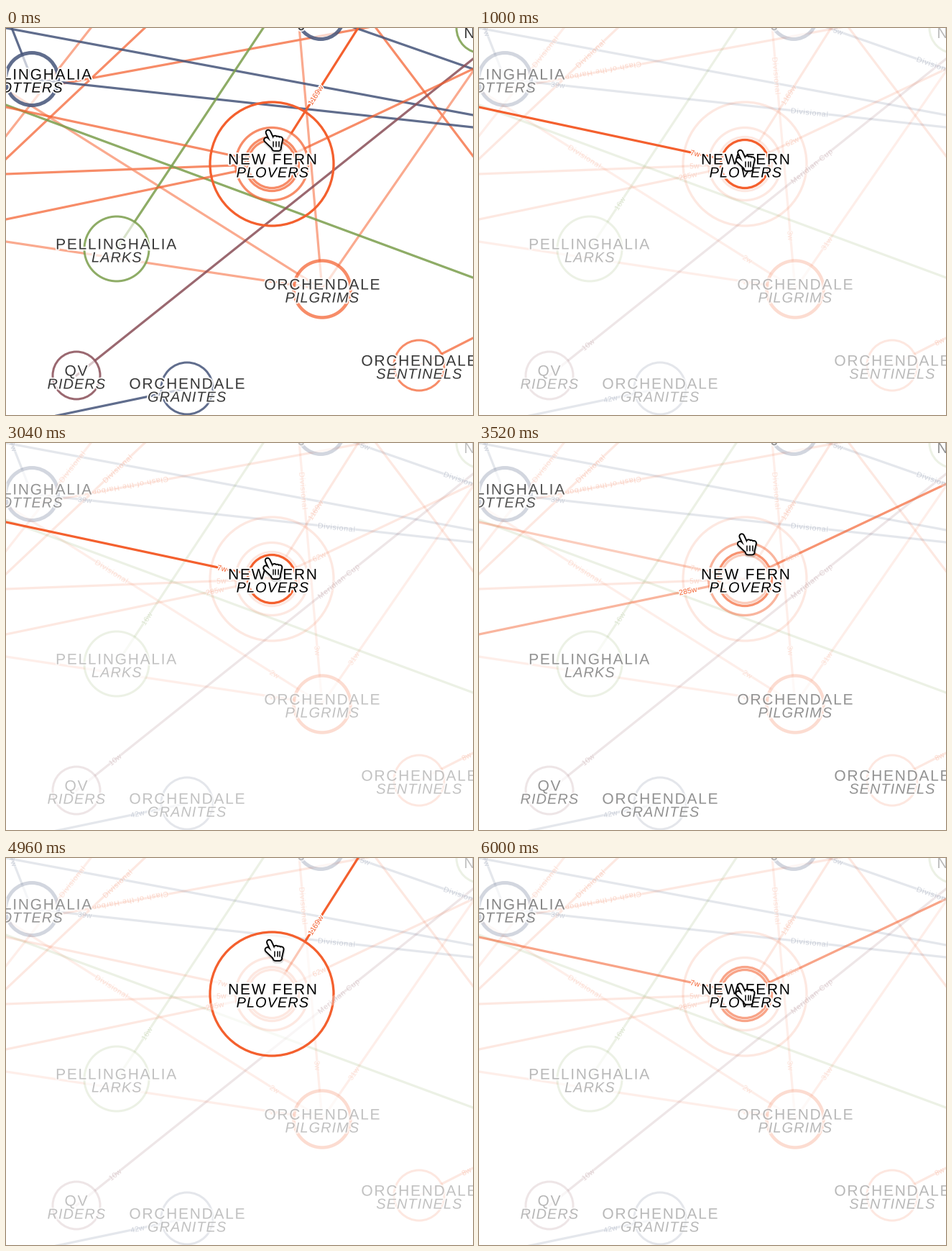
Animation, 650 px wide and 538 px high, one loop 6040 ms. Source, as a matplotlib script:

```python
import numpy as np
import matplotlib.pyplot as plt
from matplotlib.animation import FuncAnimation
from matplotlib.patches import Circle, PathPatch
from matplotlib.path import Path
from matplotlib.textpath import TextPath
from matplotlib.transforms import Affine2D

W, H = 650, 538
FRAMES, STEP = 151, 40
PX = 0.72  # points per pixel at 100 dpi
FADE = 400

ORANGE, PALE, NAVY = "#f4602e", "#f98a64", "#46557a"
GREEN, MAROON = "#7c9f4d", "#8a4f58"
FULL = {ORANGE: 0.72, PALE: 0.72}  # normal opacity, 0.86 for the others
FAINT = 0.14

fig = plt.figure(figsize=(W / 100, H / 100), dpi=100, facecolor="white")
ax = fig.add_axes([0, 0, 1, 1])
ax.set_xlim(0, W)
ax.set_ylim(H, 0)
ax.axis("off")


def mix(a, b, w):
    return a + (b - a) * w


def spaced_text(s, size, gap, style="normal"):
    """Letter-spaced outline of s, centred on x = 0, baseline at y = 0."""
    def outline(t):
        return TextPath((0, 0), t, size=size,
                        prop={"family": "Liberation Sans", "style": style})

    bar = outline("|").get_extents().x1
    glyphs = []
    for i, c in enumerate(s):
        if c != " ":
            x = outline(s[:i] + "|").get_extents().x1 - bar + gap * i
            glyphs.append(outline(c).transformed(Affine2D().translate(x, 0)))
    path = Path.make_compound_path(*glyphs)
    box = path.get_extents()
    return path.transformed(Affine2D().translate(-(box.x0 + box.x1) / 2, 0))


def add_text(path, x, y, z, color="black", angle=0, halo=4):
    """Draw a text outline over a white halo, return both."""
    path = path.transformed(
        Affine2D().scale(1, -1).rotate_deg(angle).translate(x, y))
    back = PathPatch(path, fc="white", ec="white", lw=halo * PX,
                     joinstyle="round", zorder=z)
    front = PathPatch(path, fc=color, ec="none", zorder=z + 0.1)
    ax.add_patch(back)
    ax.add_patch(front)
    return back, front


def add_ring(center, r, color, width, z):
    """Draw a white disc and its outline, return both."""
    disc = Circle(center, r, fc="white", ec="none", alpha=0.65, zorder=z)
    edge = Circle(center, r, fill=False, ec=color, lw=width * PX,
                  zorder=z + 0.1)
    ax.add_patch(disc)
    ax.add_patch(edge)
    return disc, edge


# Teams: centre, radius, colour, outline width, city, nickname
HUB = (370, 189)
OTTERS, LARKS, PILGRIMS = (36, 71), (154, 307), (440, 363)
SENTINELS, RIDERS, GRANITES = (575, 469), (98, 483), (252, 501)
TOP, CORNER = (438, -17), (662, 0)
TEAMS = [
    (OTTERS, 36.5, NAVY, 5, "PELLINGHALIA", "OTTERS"),
    (LARKS, 45, GREEN, 3, "PELLINGHALIA", "LARKS"),
    (PILGRIMS, 39.5, ORANGE, 4.5, "ORCHENDALE", "PILGRIMS"),
    (SENTINELS, 35, ORANGE, 3, "ORCHENDALE", "SENTINELS"),
    (RIDERS, 33, MAROON, 3, "QV", "RIDERS"),
    (GRANITES, 36, NAVY, 3, "ORCHENDALE", "GRANITES"),
    (TOP, 32.5, NAVY, 5, "", ""),
    (CORNER, 35, GREEN, 3, "", ""),
]
HUB_RADII = (33.5, 37.5, 50.5, 86)

# Links: colour, two ends, labels by their x on the line
LINKS = [
    (PALE, (0, 150), (118, 0), {92: "Divisional"}),
    (ORANGE, (0, 182), (193, 0), {155: "Divisional"}),
    (ORANGE, (515, -3), (36, 85), {174: "Clash of the Harbor"}),
    (ORANGE, (515, 0), (650, 178), {}),
    (ORANGE, (0, 203), HUB, {300: "5w"}),
    (PALE, (0, 297), PILGRIMS, {375: "2w"}),
    (PALE, (0, 86), PILGRIMS, {147: "Divisional", 374: "2w"}),
    (PALE, (408, -2), PILGRIMS, {414: "Divisional", 433.5: "3w"}),
    (PALE, PILGRIMS, (650, 60), {484: "31w"}),
    (ORANGE, SENTINELS, (650, 431), {641: "8w"}),
    (NAVY, (0, 0), (650, 121), {}),
    (NAVY, OTTERS, (650, 138), {110: "39w", 460: "Divisional"}),
    (NAVY, TOP, (650, 57), {500: "5w", 634: "Divisional"}),
    (NAVY, (8, 0), OTTERS, {10: "7w"}),
    (NAVY, (70, 539), GRANITES, {183: "42w"}),
    (GREEN, LARKS, (358, 0), {196: "16w"}),
    (GREEN, (0, 107), (650, 347), {}),
    (MAROON, RIDERS, (650, 43), {152: "10w", 463: "Meridian Cup"}),
]
# One link for each ring of the hub, from the inside out
HUB_LINKS = [
    (ORANGE, (0, 110), HUB, {301: "7w"}),
    (ORANGE, HUB, (650, 57), {436: "62w"}),
    (ORANGE, (0, 266), HUB, {291: "285w"}),
    (ORANGE, HUB, (490, 0), {431: "1169w"}),
]


def add_link(color, a, b, labels, z):
    (x0, y0), (x1, y1) = a, b
    line, = ax.plot([x0, x1], [y0, y1], color=color, lw=3.2 * PX, zorder=z)
    angle = np.degrees(np.arctan2(y1 - y0, x1 - x0))
    tags = []
    for x, s in labels.items():
        path = spaced_text(s, 10.5, 0.1 if s[0].isdigit() else 0.8)
        path = path.transformed(Affine2D().translate(0, -3.7))
        y = mix(y0, y1, (x - x0) / (x1 - x0))
        tags.append(add_text(path, x, y, 5, color, angle, 3))
    return line, FULL.get(color, 0.86), tags


def add_name(center, city, team):
    x, y = center
    return [add_text(spaced_text(city, 21, 1.7), x, y + 0.5, 7),
            add_text(spaced_text(team, 20, 1, "italic"), x, y + 18.5, 7)]


links = [add_link(*link, 2) for link in LINKS]
hub_links = [add_link(*link, 3) for link in HUB_LINKS]
rings = [add_ring(HUB, r, ORANGE, 3.3, 4.8 - 0.2 * k)
         for k, r in enumerate(HUB_RADII)]

nodes, names = [], []
for center, r, color, width, city, team in TEAMS:
    edge = add_ring(center, r, color, width, 4)[1]
    nodes.append((edge, FULL.get(color, 0.86), 0.048 * width))
    if city:
        names.append((add_name(center, city, team), 2 if team == "OTTERS" else 1))
names.append(([add_text(spaced_text("J", 21, 0, "italic"), 412, 3, 7),
               add_text(spaced_text("N", 21, 0), 645, 14, 7)], 1))
for back, front in add_name((HUB[0] + 1, HUB[1]), "NEW FERN", "PLOVERS"):
    back.set_alpha(0.95)


def hand_strokes():
    """Pointing hand with its finger tip at the origin, strokes split by nan."""
    strokes = [((-1.5, 4), (6, 20)), ((-4, 14.5), (6, 24)),
               ((7, 26.5), (13, 26.5))]
    strokes += [((8 + 3.7 * k, 12 + 0.8 * k), (7 + 3 * k, 24))
                for k in range(3)]
    creases = [((6 + 3.7 * k, 17), (6 + 3.7 * k, 24)) for k in range(3)]
    return [np.array([p for a, b in part for p in (a, b, (np.nan, np.nan))])
            for part in (strokes, strokes, strokes, creases)]


HAND = hand_strokes()
HAND[0] = HAND[0] + (0.5, 2)  # soft shadow
pens = [ax.plot([], [], color=color, alpha=alpha, lw=width * PX, zorder=9 + k,
                solid_capstyle="round", solid_joinstyle="round")[0]
        for k, (color, alpha, width) in enumerate(
            [("black", 0.14, 10), ("black", 1, 8.6), ("white", 1, 4.8),
             ("black", 1, 1.5)])]

# The pointer sweeps in, out and in again over the hub rings
SWEEPS = [(180, 200, (2, 1, 0)), (3200, 170, (1, 2, 3)), (5200, 300, (2, 1, 0))]
HOVERS = [(-FADE, 3)] + [(start + gap * k, ring) for start, gap, order in SWEEPS
                         for k, ring in enumerate(order)]
TIP_T = (0, 1000, 1400, 2600, 3700, 5050, 5400, 6040)
TIP_Y = (141, 169, 190, 190, 113, 113, 156, 175)


def hover_state(t):
    """Highlight of each ring, and the ring now under the pointer."""
    glow = np.zeros(4)
    ends = [start for start, _ in HOVERS[1:]] + [np.inf]
    for (start, ring), end in zip(HOVERS, ends):
        rise = np.clip((t - start) / FADE, 0, 1)
        fall = 1 - np.clip((t - end) / FADE, 0, 1)
        glow[ring] = max(glow[ring], min(rise, fall))
    return glow, [ring for start, ring in HOVERS if start <= t][-1]


def name_opacity(t, rest):
    """Names light up when a sweep starts, then sink back."""
    pulse = rest
    for start, _, _ in SWEEPS:
        age = t - start
        pulse = max(pulse, np.clip(1 + age / 120, 0, 1)
                    * np.exp(-max(age, 0) / 300))
    return 0.24 + 0.54 * pulse


def draw(i):
    t = i * STEP
    glow, current = hover_state(t)
    rest = 1 - min(t / FADE, 1)

    def show_link(link, glow=0, active=False):
        line, full, tags = link
        line.set_alpha(mix(mix(FAINT, full, rest), 1, glow))
        for back, front in tags:
            back.set_alpha(1 if active else 0.3 * (1 - rest))
            front.set_alpha(1 if active else 0.24 * (1 - rest))

    for link in links:
        show_link(link)
    for k, link in enumerate(hub_links):
        show_link(link, glow[k], k == current)

    cover = (1, 1, max(glow[2], rest), glow[3] * (1 - rest))
    for k, (disc, edge) in enumerate(rings):
        edge.set_alpha(mix(mix(FAINT, FULL[ORANGE], rest), 1, glow[k]))
        disc.set_alpha(0.65 * cover[k])
    for edge, full, faint in nodes:
        edge.set_alpha(mix(faint, full, rest))

    dim = name_opacity(t, rest)
    for lines, stack in names:
        a = 1 - (1 - dim) ** stack
        for back, front in lines:
            back.set_alpha(mix(0.5, 0.95, a))
            front.set_alpha(a)

    y = np.interp(t, TIP_T, TIP_Y)
    x = 366 + (150 - y) / 20
    for pen, points in zip(pens, HAND):
        pen.set_data(*(points + (x, y)).T)
    return []


anim = FuncAnimation(fig, draw, frames=FRAMES, interval=STEP, repeat=True)
plt.show()
```
